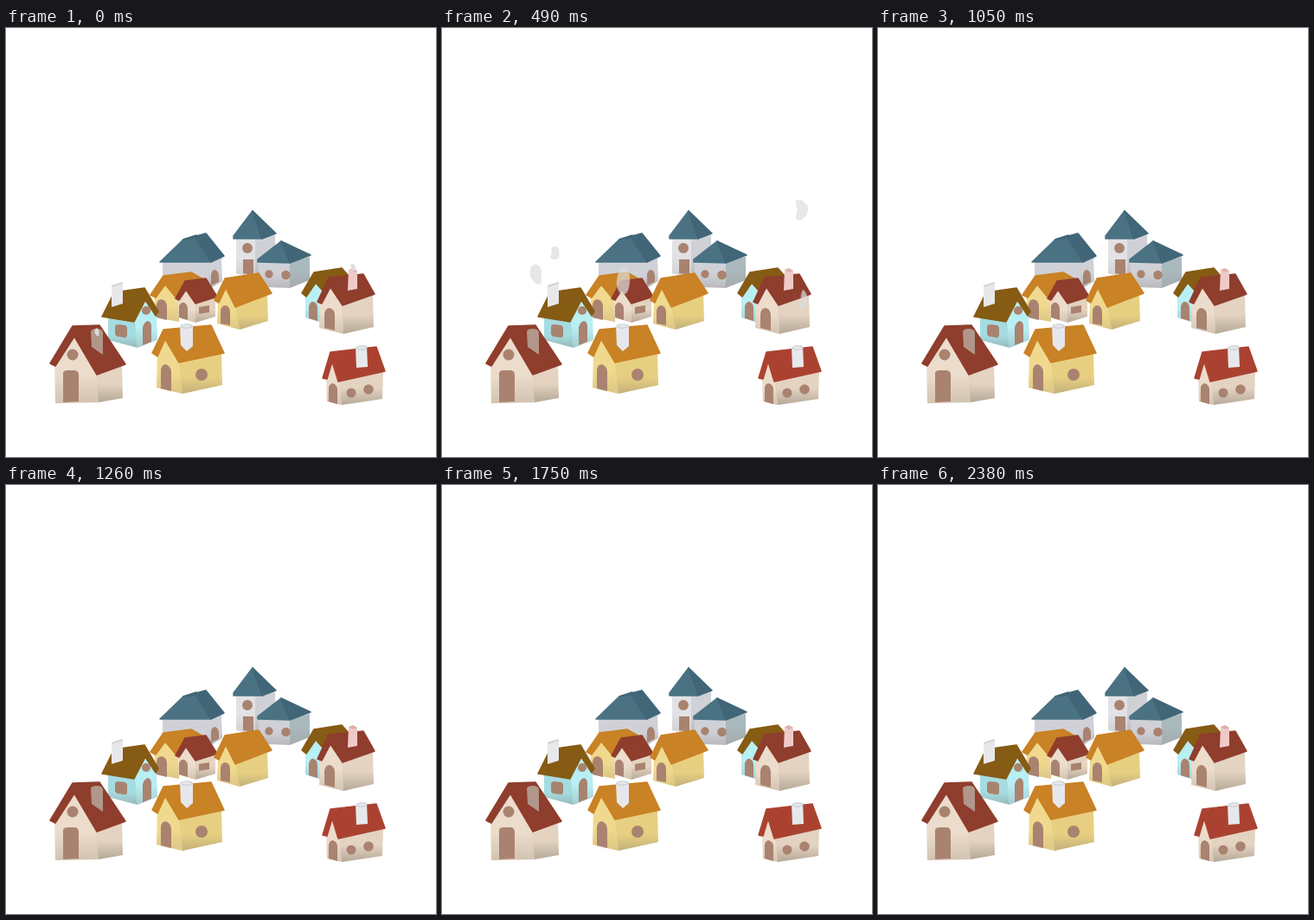
An HTML page for the animation above (2.45 s loop, 497x495 px).

```html
<!DOCTYPE html>
<html lang="en">
<head>
<meta charset="utf-8">
<title>Village smoke</title>
<style>
  html, body { margin: 0; width: 100%; height: 100%; overflow: hidden; background: #fff; }
  svg { display: block; }
  .wood { fill: #a98370; }
  .edge { stroke-width: 1.5; stroke-linejoin: round; }
  .blue { fill: #4a7283; stroke: #4a7283; }
  .navy { fill: #416677; stroke: #416677; }
  .orange { fill: #c98225; stroke: #c98225; }
  .brown { fill: #865b14; stroke: #865b14; }
  .wine { fill: #8f3d2d; stroke: #8f3d2d; }
  .red { fill: #ab4231; stroke: #ab4231; }
  .rim { fill: none; stroke: #c3c9cd; }
  .smoke { fill: #dedede; stroke: #d0d0d0; stroke-width: .6; }
</style>
</head>
<body>
<svg width="497" height="495" viewBox="0 0 497 495">
  <defs>
    <linearGradient id="grey" x2="0" y2="1"><stop offset=".5" stop-color="#cfd1d7"/><stop offset="1" stop-color="#b9b9bc"/></linearGradient>
    <linearGradient id="slate" x2="0" y2="1"><stop offset=".4" stop-color="#a9b9be"/><stop offset="1" stop-color="#a5abad"/></linearGradient>
    <linearGradient id="pale" x2="0" y2="1"><stop offset=".5" stop-color="#e2e2e6"/><stop offset="1" stop-color="#cfcfd2"/></linearGradient>
    <linearGradient id="cream" x2="0" y2="1"><stop offset=".6" stop-color="#ecdccb"/><stop offset="1" stop-color="#d2c3b1"/></linearGradient>
    <linearGradient id="sand" x2="0" y2="1"><stop offset=".5" stop-color="#e4d3c1"/><stop offset="1" stop-color="#b5a897"/></linearGradient>
    <linearGradient id="yellow" x2="0" y2="1"><stop offset=".6" stop-color="#f0d98e"/><stop offset="1" stop-color="#dcc684"/></linearGradient>
    <linearGradient id="lemon" x2="0" y2="1"><stop offset=".6" stop-color="#e7cf81"/><stop offset="1" stop-color="#c2b07a"/></linearGradient>
    <linearGradient id="teal" x2="0" y2="1"><stop offset=".6" stop-color="#a5dce1"/><stop offset="1" stop-color="#98b9ba"/></linearGradient>
    <linearGradient id="aqua" x2="0" y2="1"><stop offset=".6" stop-color="#b8eff3"/><stop offset="1" stop-color="#a5cdd0"/></linearGradient>
  </defs>

  <!-- blue roofs -->
  <path fill="url(#grey)" d="M181 270H235V303L181 297Z"/>
  <path fill="url(#grey)" d="M234 269L249 264L250 292L234 302Z"/>
  <path class="wood" d="M237 297V284Q238 279 242 279Q246 281 246 287V293Z"/>
  <path class="edge blue" d="M178 270L205 244L220 239L237 270Z"/>
  <path class="edge navy" d="M205 244L231 237L252 263L237 270L219 242Z"/>

  <path fill="url(#pale)" d="M266 242H288V288L266 283Z"/>
  <path fill="url(#grey)" d="M288 242L311 239V280L288 288Z"/>
  <circle class="wood" cx="279" cy="254" r="6"/>
  <path class="wood" d="M274 267H286V285L274 283Z"/>
  <path class="edge blue" d="M285 211L263 240V243L296 243Z"/>
  <path class="edge navy" d="M285 211L296 243L312 237Z"/>

  <path fill="url(#grey)" d="M292 269H328V300L300 299L292 296Z"/>
  <path fill="url(#slate)" d="M328 270L351 264V291L328 300Z"/>
  <circle class="wood" cx="304" cy="284" r="4.7"/>
  <circle class="wood" cx="323.500" cy="285" r="5.3"/>
  <path class="edge blue" d="M318 246L291 267V270L328 271Z"/>
  <path class="edge navy" d="M318 246L328 271L352 262Z"/>

  <!-- middle row -->
  <path fill="url(#yellow)" d="M171 309L183 290L200 310V339L174 334Z"/>
  <path class="wood" d="M174 334V319Q175 313 180 313Q186 315 186 321V337Z"/>
  <path class="edge orange" d="M167 308L182 286L214 282L230 291L217 308L198 313L184 296L173 311Z"/>

  <path fill="url(#cream)" d="M199 312L207 300L219 317V340L199 334Z"/>
  <path fill="url(#sand)" d="M219 316L242 310V333L219 340Z"/>
  <path class="wood" d="M200 334V321Q202 316 206 317Q210 319 210 324V337ZM223 322L235 320V328L223 330Z"/>
  <path class="edge wine" d="M196 312L207 292L231 289L244 310L219 318L208 302L200 314Z"/>

  <path fill="url(#yellow)" d="M245 315L253 296L267 321L270 348L244 341Z"/>
  <path fill="url(#lemon)" d="M265 320L302 307L303 338L270 348Z"/>
  <path class="wood" d="M248 341V326Q249 320 254 320Q259 322 259 328V343Z"/>
  <path class="edge orange" d="M241 314L253 289L292 283L307 306L265 322L254 300L246 317Z"/>

  <path fill="url(#aqua)" d="M346 309L356 290L368 310V341L346 334Z"/>
  <path class="wood" d="M350 335V321Q352 315 356 316Q360 318 360 323V338Z"/>
  <path class="edge brown" d="M342 306L356 282L388 277L397 287L371 309L358 294L347 310Z"/>

  <path fill="url(#cream)" d="M363 317L374 296L389 320L390 353L362 346Z"/>
  <path fill="url(#sand)" d="M388 319L424 308L425 345L390 353Z"/>
  <path class="wood" d="M368 346V330Q369 323 374 323Q380 325 380 331V349Z"/>
  <path class="edge wine" d="M360 316L373 288L413 284L426 307L389 320L375 299L365 318Z"/>
  <path fill="#efcbc7" d="M396 279L406 280V301L395 303Z"/>
  <path fill="#dfb1ab" d="M396 279L401 277L406 280L401 282Z"/>

  <!-- front row -->
  <path fill="url(#teal)" d="M118 333H150L152 369L118 360Z"/>
  <path fill="url(#aqua)" d="M149 339L160 310L174 331L175 360L152 369Z"/>
  <path class="wood" d="M126 345Q126 342 130 342L138 343Q140 344 140 347V355Q139 358 136 357L129 356Q126 355 126 352ZM158 366V345Q160 339 164 338Q168 339 168 344V362Z"/>
  <circle class="wood" cx="162" cy="326" r="5"/>
  <path class="edge brown" d="M111 333L125 305L160 300L176 327L173 332L161 314L148 339Z"/>
  <path fill="#e8e8ea" d="M122 297L135 293V318L122 322Z"/>
  <path fill="#d2d3d5" d="M122 297L135 293V295L123 299Z"/>

  <path fill="url(#cream)" d="M56 386L78 353L107 399V432L57 433Z"/>
  <path fill="url(#sand)" d="M104 399L134 389L135 427L107 432Z"/>
  <circle class="wood" cx="77" cy="377" r="6.5"/>
  <path class="wood" d="M66 432V398Q67 395 71 395H80Q84 396 84 400V431Z"/>
  <path class="edge wine" d="M51 387L77 344L108 343L138 388L105 400L79 356L57 390Z"/>
  <path fill="#b1968a" d="M98 350Q99 347 105 347Q111 347 112 351V377L99 368Z"/>

  <path fill="url(#yellow)" d="M175 376L184 356L202 385L204 422L174 415Z"/>
  <path fill="url(#lemon)" d="M200 385L249 375L250 412L204 422Z"/>
  <circle class="wood" cx="226" cy="400" r="7"/>
  <path class="wood" d="M179 416V394Q180 388 185 388Q191 391 191 397V419Z"/>
  <path class="edge orange" d="M169 375L182 348L237 343L252 375L200 386L184 359L175 379Z"/>
  <path fill="#e6e7ec" d="M201 343L216 342V367L209 373L202 366Z"/>
  <ellipse class="rim" cx="208.500" cy="344" rx="6.500" ry="2.200"/>

  <path fill="url(#cream)" d="M370 403L377 381L386 408L388 435L371 431Z"/>
  <path fill="url(#sand)" d="M385 407L436 396L435 428L388 435Z"/>
  <circle class="wood" cx="399" cy="421" r="5.500"/>
  <circle class="wood" cx="419" cy="417" r="5.800"/>
  <path class="wood" d="M373 431V415Q374 410 378 410Q383 412 383 417V434Z"/>
  <path class="edge red" d="M366 404L375 374L428 368L438 396L384 408L377 385L371 405Z"/>
  <path fill="#e6e9ec" d="M404 368L417 366L418 391L405 392Z"/>
  <ellipse class="rim" cx="411" cy="369" rx="6" ry="2.200"/>

  <g id="puffs"></g>
</svg>
<script>
const LOOP = 2450, STEP = 70, SMOKE_END = 700, RISE = 0.136;

// Chimney mouth, start time, sideways speed and outline around its own centre
const puffs = [
  { x: 401, y: 277, start: 0, drift: 0.029, d: 'M-6-11Q1-13 4-8Q9-5 7 1Q6 9-2 11Q-8 11-5 4Q-3 0-5-4Z' },
  { x: 105, y: 351, start: 0, drift: 0.007, d: 'M-5-9Q0-13 4-9Q7-5 6 1V10Q2 13-2 8Q-7 4-6-2Z' },
  { x: 411, y: 368, start: 85, drift: 0.015, d: 'M0-11Q5-7 5 0Q7 8 1 10Q-5 12-5 6Q-1 1-2-5Z' },
  { x: 208.5, y: 343, start: 110, drift: 0.003, d: 'M-2-15Q4-18 6-11Q9 1 5 12Q1 19-4 14Q-9 7-7-3Q-6-9-2-15Z' },
  { x: 128, y: 295, start: 230, drift: 0.010, d: 'M-4-4Q-3-8 1-7Q6-5 4-1Q6 5 1 7Q-5 8-5 3Q-2 0-4-4Z' }
];

const layer = document.getElementById('puffs');
for (const puff of puffs) {
  puff.node = document.createElementNS('http://www.w3.org/2000/svg', 'path');
  puff.node.setAttribute('class', 'smoke');
  puff.node.setAttribute('d', puff.d);
  layer.append(puff.node);
}

function draw() {
  const time = Math.floor(performance.now() % LOOP / STEP) * STEP;
  for (const { node, x, y, start, drift } of puffs) {
    const age = time - start;
    const visible = age >= 0 && time < SMOKE_END;
    node.style.display = visible ? '' : 'none';
    if (!visible) continue;
    const scale = Math.min(1, 0.4 + age / 200);
    node.setAttribute('transform', `translate(${x + drift * age} ${y - RISE * age}) scale(${scale})`);
    node.style.opacity = Math.min(0.95, (SMOKE_END - time) / 300);
  }
  requestAnimationFrame(draw);
}
draw();
</script>
</body>
</html>
```
